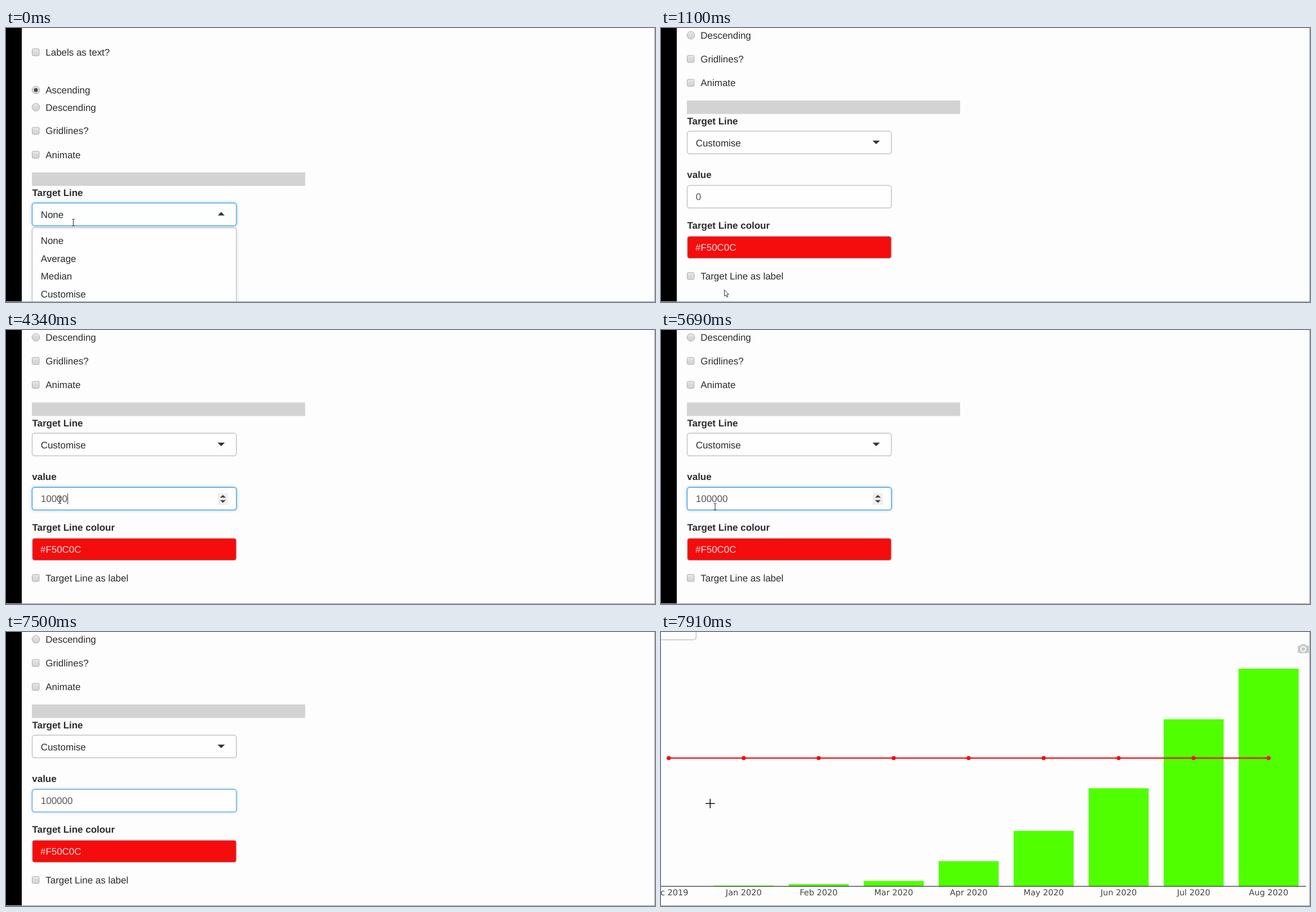
Recreate the animation shown at these times as an HTML page. Size 1152 px wide and 486 px high, loop 8 s.

```html
<!DOCTYPE html>
<html lang="en">
<head>
<meta charset="utf-8">
<title>Target line settings</title>
<style>
  html, body { margin: 0; height: 100%; overflow: hidden; background: #fdfdfd; }
  svg { display: block; width: 100%; height: 100%; }
  text { font: 16.95px "Liberation Sans", Arial, sans-serif; fill: #2b2b2b; text-rendering: geometricPrecision; white-space: pre; }
  .bold { font-weight: bold; }
  .field { fill: #fefefe; stroke: #c4c4c4; stroke-width: 1.5; }
  .focus { fill: #fefefe; stroke: #5ba9e6; stroke-width: 1.5; filter: drop-shadow(0 0 2.5px rgba(102, 175, 233, .65)); }
  .dark { fill: #333; }
  .tick { font: 14.5px Verdana, "DejaVu Sans", sans-serif; fill: #444; text-anchor: middle; }
  .box { fill: url(#shade); stroke: #adadad; }
</style>
</head>
<body>
<svg viewBox="0 0 1152 486" preserveAspectRatio="none">
  <defs>
    <linearGradient id="shade" x2="0" y2="1">
      <stop stop-color="#ececec"/><stop offset=".45" stop-color="#dadada"/><stop offset="1" stop-color="#d6d6d6"/>
    </linearGradient>
  </defs>

  <g id="form">
    <g id="page">
      <g id="options"></g>
      <circle class="dark" cx="53" cy="110" r="3.5" fill-opacity=".85"/>
      <rect x="46" y="256" width="485" height="24" fill="#d3d3d3"/>
      <text class="bold" x="46.5" y="298">Target Line</text>
      <rect id="select" x="46.5" y="310.5" width="362.5" height="40.3" rx="4.5"/>
      <text id="choice" x="61.7" y="337"></text>
      <path id="caretUp" class="dark" d="M376 332.5l6-6.3 6 6.3z"/>
      <path id="caretDown" class="dark" d="M375.5 327.3h13l-6.5 6.3z"/>

      <g id="custom">
        <text class="bold" x="46.3" y="393.5">value</text>
        <rect class="field" x="46.5" y="406.8" width="362.5" height="40" rx="4.5"/>
        <rect id="focus" class="focus" x="46.5" y="406.8" width="362.5" height="40" rx="4.5"/>
        <rect id="selection" x="62" y="417.5" width="9.6" height="19" fill="#3390ff"/>
        <text id="value" x="61.8" y="432.5"></text>
        <rect id="insertion" y="417.5" width="1" height="19" fill="#333"/>
        <g id="spinner">
          <rect x="376" y="417" width="18" height="20.5" fill="#eee"/>
          <path fill="#444" d="M379.8 424.8l5.2-4.8 5.2 4.8zM379.8 429.2l5.2 4.8 5.2-4.8z"/>
        </g>
        <text class="bold" x="46.5" y="483.5">Target Line colour</text>
        <rect class="field" x="46.5" y="496.8" width="362.5" height="39.5" rx="4.5" style="fill:#f50c0c"/>
        <text x="61" y="522" style="fill:#ecdcdc">#F50C0C</text>
      </g>

      <g id="menu">
        <rect x="46.5" y="354.3" width="362.3" height="170" rx="4" fill="#fefefe" stroke="#bdbdbd" stroke-width="1.2"
              style="filter:drop-shadow(0 3px 3px rgba(0,0,0,.12))"/>
        <rect id="hover" x="47.3" width="360.8" height="31.6" fill="#f5f5f5"/>
        <g id="choices"></g>
      </g>
    </g>
    <rect width="28" height="486"/>
  </g>

  <g id="chart">
    <rect width="1152" height="486" fill="#fdfdfd"/>
    <path d="M-5 13.7H58a4.3 4.3 0 0 0 4.3-4.3V-5" fill="none" stroke="#c4c4c4" stroke-width="1.5"/>
    <path fill="#c8c8c8" d="M1132 24h3.5l1.6-2.8h6l1.6 2.8h3.5q1.8 0 1.8 1.8v10q0 1.8-1.8 1.8h-16q-1.8 0-1.8-1.8v-10q0-1.8 1.8-1.8z"/>
    <circle cx="1140" cy="30.3" r="4.3" fill="none" stroke="#fdfdfd" stroke-width="2"/>
    <g id="bars"></g>
    <path d="M0 451.2H1145" stroke="#333" stroke-width="1.3"/>
    <path d="M13.7 223.6H1078.4" stroke="#f50c0c" stroke-width="2.4"/>
    <g id="dots" fill="#f50c0c"></g>
  </g>

  <path d="M0 485.4H1152M1151.4 0V486" stroke="#aaa" stroke-width="1.2"/>

  <g id="pointer">
    <path id="arrow" d="M0 0V11.2L2.6 8.9 4.4 12.8 6.2 12 4.5 8.2H7.8Z" fill="#fff" stroke="#222" stroke-width=".9"/>
    <path id="beam" d="M-2.5-5.7H-.6L0-5.2.6-5.7H2.5M0-5.2V5.2M-2.5 5.7H-.6L0 5.2.6 5.7H2.5" fill="none" stroke="#222" stroke-width="1"/>
    <path id="cross" d="M-8.3 0H8.3M0-8.3V8.3" stroke="#111" stroke-width="1.6"/>
  </g>
</svg>

<script>
const LOOP = 8000, SCROLL = 127.5;
const $ = id => document.getElementById(id);
const show = (id, on) => $(id).style.display = on ? '' : 'none';
const within = (t, from, to) => t >= from && t < to;
// Last entry whose start time has passed.
const current = (track, t) => track.filter(([start]) => start <= t).pop();

const options = [
  ['Labels as text?', 43], ['Ascending', 110, true], ['Descending', 140.5, true],
  ['Gridlines?', 182.4], ['Animate', 224.8], ['Target Line as label', 567.3]
];
$('options').innerHTML = options.map(([label, y, radio]) =>
  (radio ? `<circle class="box" cx="53" cy="${y}" r="6.8"/>`
         : `<rect class="box" x="46.5" y="${y - 6.2}" width="12.4" height="12.4" rx="2"/>`) +
  `<text x="70.3" y="${y + 6}">${label}</text>`).join('');
$('options').lastChild.previousSibling.id = 'labelBox';
$('options').lastChild.id = 'labelText';

$('choices').innerHTML = ['None', 'Average', 'Median', 'Customise'].map((label, i) =>
  `<text x="61.7" y="${383 + 31.6 * i}">${label}</text>`).join('');

const months = [['Dec 2019', 451], ['Jan 2020', 449.8], ['Feb 2020', 447.3], ['Mar 2020', 441.5],
  ['Apr 2020', 406.5], ['May 2020', 352.8], ['Jun 2020', 277.2], ['Jul 2020', 154.8], ['Aug 2020', 65]];
const monthX = i => 13.7 + 133.1 * i;
$('bars').innerHTML = months.map(([label, top], i) =>
  `<rect x="${monthX(i) - 53.2}" y="${top}" width="106.5" height="${451 - top}" fill="#50ff00"/>` +
  `<text class="tick" x="${monthX(i)}" y="467">${label}</text>`).join('');
$('dots').innerHTML = months.map((_, i) => `<circle cx="${monthX(i)}" cy="223.6" r="3.7"/>`).join('');

const pointerTrack = [
  [0, 'beam', 119.5, 345], [270, 'arrow', 120, 368], [410, 'arrow', 118, 402], [550, 'arrow', 115, 440],
  [690, 'arrow', 112.5, 464.5], [1240, 'arrow', 112, 461], [1380, 'arrow', 110, 440], [1520, 'arrow', 107, 400],
  [1660, 'arrow', 103, 350], [1800, 'beam', 98, 312], [1940, 'beam', 95.5, 301.8], [5690, 'beam', 96, 313.5],
  [5830, 'arrow', 180, 230], [5960, 'arrow', 400, 90], [6100, 'arrow', 640, 0], [6240, 'arrow', 820, 80],
  [6370, 'arrow', 940, 230], [6510, 'arrow', 1020, 400], [6640, 'arrow', 1038, 470], [6770, 'arrow', 1036, 478],
  [6920, 'none', 0, 0], [7630, 'cross', 42.8, 332], [7770, 'cross', 72, 314], [7910, 'cross', 87.3, 304.3]
];
const valueTrack = [[0, '0'], [2460, ''], [3020, '1'], [3210, '10'], [3410, '100'],
  [3810, '1000'], [4340, '10000'], [4750, '100000']];
const focusTrack = [[0, 0], [1940, 1], [7380, .95], [7500, .75]];

function draw(t) {
  const [, kind, x, y] = current(pointerTrack, t);
  const open = t < 830, custom = t >= 970;
  const onChart = t >= 7630;

  show('form', !onChart);
  show('chart', onChart);
  $('page').setAttribute('transform', `translate(0 ${t >= 1100 ? -SCROLL : 0})`);

  $('select').setAttribute('class', t < 970 ? 'focus' : 'field');
  $('choice').textContent = open ? 'None' : 'Customise';
  show('caretUp', open);
  show('caretDown', !open);
  show('menu', open);
  const row = Math.floor((y - 361) / 31.6);
  show('hover', open && row >= 0);
  $('hover').setAttribute('y', 361 + 31.6 * Math.max(row, 0));

  for (const id of ['custom', 'labelBox', 'labelText']) show(id, custom);
  const value = current(valueTrack, t)[1];
  const selected = within(t, 2080, 2460);
  $('value').textContent = value;
  $('value').style.fill = selected ? '#fff' : '#555';
  show('selection', selected);
  $('focus').style.opacity = current(focusTrack, t)[1];
  show('spinner', within(t, 1800, 5830));

  const blinkOn = within(t, 5830, 6370) || within(t, 6920, 7380);
  show('insertion', within(t, 1940, 2080) || within(t, 2460, 2610) || within(t, 3020, 5300) || blinkOn);
  $('insertion').setAttribute('x', 62 + 9.42 * value.length);

  for (const id of ['arrow', 'beam', 'cross']) show(id, id === kind);
  $('pointer').setAttribute('transform', `translate(${x} ${y})`);
}

const begin = performance.now();
function tick() {
  draw((performance.now() - begin) % LOOP);
  requestAnimationFrame(tick);
}
tick();
</script>
</body>
</html>
```
